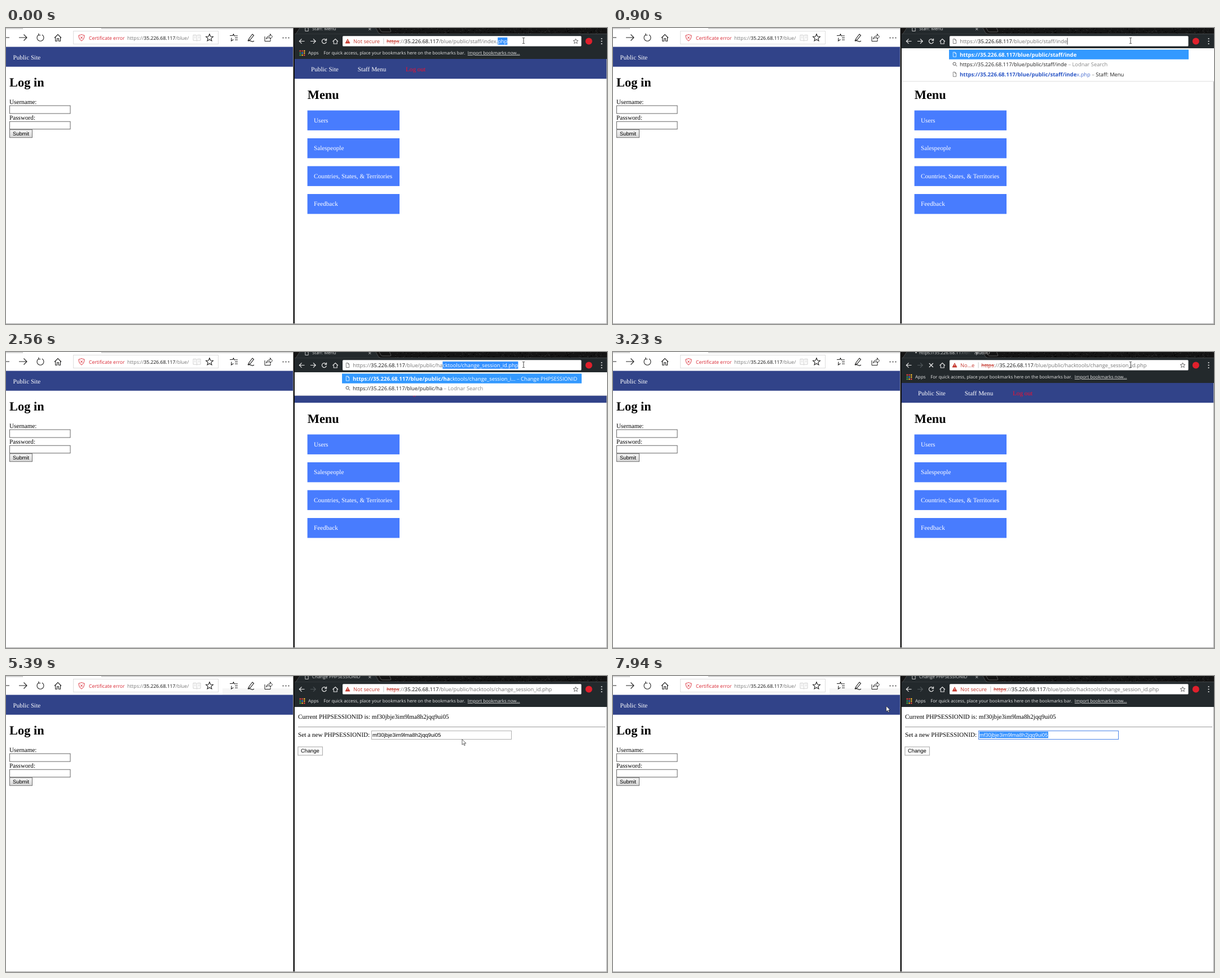
Recreate the animation shown at these times as an HTML page. Size 1066x526 px, loop 8 s.

```html
<!DOCTYPE html>
<html lang="en">
<head>
<meta charset="utf-8">
<title>Two browser windows</title>
<style>
  html, body { margin: 0; width: 100%; height: 100%; overflow: hidden; background: #fff; }
  svg { display: block; width: 1066px; height: 526px; }
  text { white-space: pre; text-rendering: geometricPrecision; }
  .ui { font: 9.34px "Open Sans", "Noto Sans", sans-serif; }
  .bar { font: 7.95px "Open Sans", "Noto Sans", sans-serif; }
  .edge { font: 8.62px "Open Sans", "Noto Sans", sans-serif; }
  .page { font: 11.2px "Liberation Serif", "Times New Roman", serif; }
  .head { font: bold 22.4px "Liberation Serif", "Times New Roman", serif; }
  .form { font: 9.33px "Liberation Sans", Arial, sans-serif; }
  .b { font-weight: bold; font-size: 9.55px; }
  .strike { text-decoration: line-through; }
</style>
</head>
<body>
<svg id="stage" viewBox="0 0 1066 526" xmlns="http://www.w3.org/2000/svg">
  <defs>
    <linearGradient id="face" x2="0" y2="1"><stop stop-color="#f6f6f6"/><stop offset="1" stop-color="#d6d6d6"/></linearGradient>
    <linearGradient id="fade"><stop stop-color="#23292c" stop-opacity="0"/><stop offset="1" stop-color="#23292c"/></linearGradient>
  </defs>
  <g id="left"></g><g id="view"></g><g id="chrome"></g><g id="mouse"></g>
</svg>
<script>
const LOOP = 8000;
const NAVY = '#314389', TOOL = '#23292c', SELECT = '#3390ff', RED = '#c5392f';
const HOST = '35.226.68.117', BASE = `https://${HOST}/blue/public/`;
const SESSION = 'mf30jbje3im9lma8h2jqq9ui05';
const CHANGE = 'hacktools/change_session_id.php';
const history = [
  [CHANGE, 'Change PHPSESSIONID'],
  ['staff/login.php', 'Staff: Menu'],
  ['staff/index.php', 'Staff: Menu'],
];
const $ = id => document.getElementById(id);

const rect = (x, y, w, h, fill, more = '') =>
  `<rect x="${x}" y="${y}" width="${w}" height="${h}" fill="${fill}" ${more}/>`;
const frame = (x, y, w, h, color, fill = '#fff') => rect(x, y, w, h, fill, `stroke="${color}"`);
const line = (d, color, width = 1, fill = 'none') =>
  `<path d="${d}" stroke="${color}" stroke-width="${width}" fill="${fill}"/>`;
const dot = (x, y, r, fill) => `<circle cx="${x}" cy="${y}" r="${r}" fill="${fill}"/>`;
const text = (x, y, cls, s, fill = '#000', more = '') =>
  `<text x="${x}" y="${y}" class="${cls}" fill="${fill}" ${more}>${s}</text>`;
const span = (s, fill, cls = '') => `<tspan fill="${fill}" class="${cls}">${s}</tspan>`;

function star(x, y, r, color, width) {
  const points = Array.from({ length: 10 }, (_, i) => {
    const a = i * Math.PI / 5, d = i % 2 ? r * .45 : r;
    return `${x + d * Math.sin(a)} ${y - d * Math.cos(a)}`;
  });
  return line(`M${points.join('L')}Z`, color, width);
}
const file = (x, y, color) =>
  line(`M${x - 2.7} ${y - 4}h3.4l2 2v6h-5.4zM${x + .6} ${y - 4}v2.2h2`, color, .8);

// Left window: toolbar and login page
function drawLeft(shade) {
  const ink = '#222';
  return rect(0, 0, 510, 526, '#fff')
    + line('M0 1h29M170 1h340', '#aaa') + line('M29.5 0v2M169.5 0v2', '#ccc')
    + (shade ? rect(384, 22, 125, 11.5, '#f6f6f6') : '')
    + line('M0 17h6M23 17h14M31.5 11.5l5.5 5.5-5.5 5.5', ink, 1.1)
    + line('M58 12a6 6 0 1 0 6 0M58 9.5v3.3h3.3', ink, 1.1)
    + line('M86 17.5l6-6 6 6M87.7 16.5v6.8h3v-4.5h2.8v4.5h3v-6.8', ink, 1.1)
    + frame(119.5, 5.5, 257, 23, '#dedede')
    + line('M134 11.5q2.5 1.5 5 1.5 0 7-5 10-5-3-5-10 2.500 0 5-1.500zM132 15.200l4 4m0-4l-4 4', '#d8222e', .9)
    + text(147, 20.6, 'edge', 'Certificate error', '#d8222e')
    + text(215, 20.6, 'edge', span('https://', '#777') + span(HOST, '#111') + span('/blue/', '#777'))
    + line('M332 12.500h5l1.500 1 1.500-1h5v9.500h-5l-1.500 1-1.500-1h-5zM338.500 13.500v9M334 15h2.500m-2.500 2.500h2.500M341 15h2.500m-2.500 2.500h2.500', '#c4c4c4', .8)
    + star(361, 17.500, 6.700, ink, 1.100)
    + line('M397 13.500h5l1.500-2.500 1.500 3h6M400 17.500l-.500 5.500 4-2.500M406 17.500h5M406 21h5', ink, 1.100)
    + line('M429 23l2-4 6-8 2.500 2-6 7.500-4.500 2.500q4-1 6 .500t5-.500', ink, 1.100)
    + line('M459 15v8.500h10v-3M461.500 19.500q1-5.500 7-5.500v-3.500l4 5-4 4.500v-3q-4.500-.500-7 2.500z', ink, 1)
    + dot(491.500, 17.500, .9, ink) + dot(496.500, 17.500, .9, ink) + dot(501.500, 17.500, .9, ink)
    + rect(0, 33.500, 509, 35.300, NAVY)
    + text(12.500, 55.600, 'page', 'Public Site', '#fff')
    + text(6, 104.200, 'head', 'Log in')
    + text(6, 134.700, 'page', 'Username:') + frame(6.500, 138, 107.500, 14, '#666')
    + text(6, 162.900, 'page', 'Password:') + frame(6.500, 166.200, 107.500, 13.500, '#666')
    + frame(6.500, 180.700, 40, 14, '#707070', 'url(#face)')
    + text(12, 191.300, 'form', 'Submit')
    + rect(509, 0, 1, 526, '#888') + rect(510, 0, 2.300, 526, '#111');
}

function drawMenu() {
  const items = ['Users', 'Salespeople', 'Countries, States, &amp; Territories', 'Feedback'];
  return rect(512, 55, 554, 35.200, NAVY)
    + text(541, 76.600, 'page', 'Public Site', '#fff')
    + text(623.800, 76.600, 'page', 'Staff Menu', '#fff')
    + text(709, 76.600, 'page', 'Log out', '#f5102e')
    + text(534.800, 125.700, 'head', 'Menu')
    + items.map((s, i) => rect(534.600, 146.500 + i * 49.500, 163.400, 35.400, '#487cfe')
      + text(546, 167.700 + i * 49.500, 'page', s, '#fff')).join('');
}

function drawForm(marked) {
  const from = 772 - 122 * marked;
  return text(518, 76, 'page', `Current PHPSESSIONID is: ${SESSION}`)
    + line('M518 90.500h545', '#999')
    + text(518, 107.900, 'page', 'Set a new PHPSESSIONID:')
    + frame(648.500, 97.500, 248, 15, marked ? '#4d86e8' : '#b0b0b0')
    + text(650, 107.700, 'form', SESSION)
    + (marked ? `<clipPath id="mark">${rect(from, 98.500, 772 - from, 12, '#000')}</clipPath>`
      + `<g clip-path="url(#mark)">${rect(from, 98.500, 122, 12, SELECT)}${text(650, 107.700, 'form', SESSION, '#fff')}</g>` : '')
    + frame(517.900, 125.900, 43.500, 15, '#a8a8a8', '#fbfbfb')
    + text(523, 136.400, 'form', 'Change');
}

function speckle() {
  let seed = 7, out = '';
  const rnd = () => (seed = seed * 16807 % 2147483647) / 2147483647;
  for (let i = 0; i < 220; i++)
    out += rect(Math.floor(690 + rnd() * 376), Math.floor(rnd() * 10), 2, 1, rnd() < .5 ? '#262626' : '#060606');
  return out;
}
const TEXTURE = speckle();

function drawFrame(s) {
  const pale = '#e8e8e8', dim = '#50575a';
  const colors = ['#e8453c', '#e8453c', '#f9bb2d', '#3aa757', '#4688f1', '#f9bb2d', '#3aa757', '#f9bb2d', '#e8453c'];
  const grid = colors.map((c, i) => rect(520.600 + i % 3 * 3.700, 39.600 + Math.floor(i / 3) * 3.700, 2.400, 2.400, c)).join('');
  return rect(512, 0, 554, 10.500, '#141414') + TEXTURE
    + `<path d="M514 10.500L521 0H656L663 10.500Z" fill="${TOOL}"/>`
    + line('M514 10.500L521 0M656 0l4 7.500q1 2.500 4 2.500', '#555', .8)
    + line('M662 0l3 5.500q1 1.500 3 1.500h13q2.500 0 1.500-2l-2-5', '#666', .8)
    + rect(512, 10.300, 554, 44.700, TOOL)
    + (s.busy ? dot(537.500, 1, 1.200, '#ccc') : file(533.500, 1.500, pale))
    + text(543, 4, 'bar', s.tab, '#d5d5d5')
    + (s.busy ? rect(610, 0, 27, 8, 'url(#fade)') + rect(637, 0, 4, 8, TOOL) : '')
    + line('M643.300 0l4 4m0-4l-4 4', '#ccc', .9)
    + line('M529.500 23.500h-9M524.500 19.300l-4.200 4.200 4.200 4.200', pale, 1.200)
    + line('M540 23.500h9M545 19.300l4.200 4.200-4.200 4.200', s.next ? pale : dim, 1.200)
    + (s.busy ? line('M560.800 20l7 7m0-7l-7 7', pale, 1.300)
      : line('M567.500 21a4 4 0 1 0 .8 3.500M568.500 18.800v3.400h-3.400', pale, 1.200))
    + line('M579.500 24l4.700-4.500 4.700 4.500M581.200 23.500v4.500h6v-4.500', pale, 1.100)
    + rect(597, 14.300, 423.500, 18.200, '#fff', 'rx="1.500"')
    + dot(1033.800, 23.500, 6, '#e0202c')
    + [19, 23.500, 28].map(y => dot(1056.500, y, 1.100, pale)).join('')
    + grid + text(536, 46.900, 'bar', 'Apps', pale)
    + text(563.200, 46.900, 'bar', 'For quick access, place your bookmarks here on the bookmarks bar.', pale)
    + text(818.800, 46.900, 'bar', 'Import bookmarks now...', pale, 'text-decoration="underline"');
}

function drawUrl(x, path, secureMark) {
  const scheme = secureMark ? span('https', RED, 'strike') + span('://', '#777') : span('https://', '#777');
  return text(x, 26.900, 'ui', scheme + span(HOST, '#111') + span('/blue/public/' + path, '#777'), '#777', 'id="url"');
}

function drawResting(s) {
  const x = s.urlX;
  return line('M606 19.700l4 7.300h-8z', RED, .8, RED) + rect(605.600, 21.500, .9, 3, '#fff')
    + (s.chip ? text(616, 26.900, 'ui', s.chip, RED) + line(`M${x - 5.200} 18.500v10`, '#bbb', .8) : '')
    + star(1010.500, 23.700, 4.600, '#555', .9) + drawUrl(x, s.path, true);
}

function drawTyping(q) {
  const auto = q.startsWith('h');
  const hits = q ? [history.find(h => h[0].startsWith(q))] : history;
  const title = (s, dash, color) => span(' – ', dash) + span(s, color);
  const first = span(BASE + q, '#fff', 'b')
    + (auto ? span(CHANGE.slice(q.length, 26) + '...', '#fff') + title(history[0][1], '#b9dcff', '#fff') : '');
  const rows = [first, span(BASE + q, '#222') + title('Lodnar Search', '#999', '#888')];
  if (!auto) for (const [path, name] of hits)
    rows.push(span(BASE + q, '#2a56c6', 'b') + span(path.slice(q.length), '#4a6fd0') + title(name, '#888', '#222'));
  const bottom = 42 + 17.600 * rows.length;
  return file(606, 23.500, '#666') + drawUrl(615.300, auto ? CHANGE : q, false)
    + rect(512, 36, 554, bottom - 36, '#fff') + line(`M512 ${bottom}h554`, '#dedede')
    + rect(596, 38.400, 425, 17.300, '#3399ff')
    + rows.map((r, i) => {
      const y = 47.100 + i * 17.600;
      const icon = i === 1 ? line(`M607.600 ${y + .8}l2.600 2.600M608.200 ${y - 1}a2.600 2.600 0 1 0-5.200 0 2.600 2.600 0 1 0 5.200 0`, '#555', 1)
        : file(606, y, i ? '#666' : '#fff');
      return icon + text(615, y + 3.500, 'ui', r);
    }).join('');
}

// Highlights the end of the address, or places the caret there
function finishUrl(s) {
  const url = $('url'), x = +url.getAttribute('x'), all = url.textContent;
  const auto = s.typed && s.typed.startsWith('h');
  const kept = auto ? BASE + s.typed : s.markEnd ? all.slice(0, -3) : all;
  const start = x + url.getSubStringLength(0, kept.length);
  const marked = all.slice(kept.length);
  if (marked) {
    const width = x + url.getComputedTextLength() - start;
    url.insertAdjacentHTML('afterend', rect(start, 16.800, width, 13, SELECT) + text(start, 26.900, 'ui', marked, '#fff'));
  } else if (s.typed !== null) {
    url.insertAdjacentHTML('afterend', rect(start + .3, 17.500, .8, 12, '#222'));
  }
}

function drawMouse([kind, x, y]) {
  const shape = kind === 'beam'
    ? line('M-2-5h1.500l.5.5.5-.5h1.500M0-4.500v9M-2 5h1.500l.5-.5.5.5h1.500', '#333', .9)
    : line('M0 0v9.700l2.300-2.100 1.500 3.400 1.600-.7-1.500-3.300h3z', '#222', .7, '#fff');
  return `<g transform="translate(${x} ${y})">${shape}</g>`;
}

const start = {
  page: 'menu', tab: 'Staff: Menu', busy: false, next: true, typed: null, markEnd: true,
  path: 'staff/index.php', chip: 'Not secure', urlX: 675, marked: 0, shade: false,
  mouse: ['beam', 918, 22.500],
};
const type = (t, typed) => [t, { typed, markEnd: false }];
const move = (t, kind, x, y, more) => [t, { mouse: [kind, x, y], ...more }];
const steps = [
  [0, start],
  type(500, 'staff/index.'), type(770, 'staff/index'), type(900, 'staff/inde'), type(1050, 'staff/ind'),
  type(1150, 'staff/in'), type(1250, 'staff/i'), type(1350, 'staff/'), type(1450, 'staff'),
  type(1590, 'staf'), type(1730, 'sta'), type(1870, 'st'),
  type(2140, 's'), type(2280, ''), type(2420, 'h'), type(2560, 'ha'),
  [2970, { typed: null, path: CHANGE, chip: '', urlX: 615, busy: true, next: false, tab: BASE }],
  [3100, { chip: '...', urlX: 633 }],
  [3230, { chip: 'No...e', urlX: 653.300 }],
  [3360, { chip: 'Not secure', urlX: 675, busy: false, tab: 'Change PHPSESSIONID', page: 'form' }],
  move(3500, 'arrow', 884, 44), move(3750, 'arrow', 830, 92), move(3890, 'arrow', 800, 122),
  move(4040, 'arrow', 770, 119, { shade: true }), move(4180, 'arrow', 722, 94), move(4320, 'beam', 676, 74),
  move(4460, 'beam', 660, 73), move(4600, 'beam', 690, 73), move(4740, 'beam', 730, 72),
  move(4870, 'beam', 765, 71), move(5010, 'beam', 785, 70),
  move(5150, 'arrow', 794, 82), move(5270, 'arrow', 804, 100), move(5390, 'arrow', 809, 112.500),
  move(5520, 'arrow', 808, 114), move(5660, 'beam', 800, 108), move(5800, 'beam', 788, 105), move(5940, 'beam', 777, 104),
  move(6340, 'beam', 730, 103, { marked: .35 }), move(6480, 'beam', 672, 101, { marked: .82 }),
  move(6620, 'arrow', 634, 86, { marked: 1 }), move(6760, 'arrow', 614.500, 50),
  move(7940, 'arrow', 484.700, 53.500),
];
let state = {};
const timeline = steps.map(([t, change]) => [t, state = { ...state, ...change }]);

function render(s) {
  $('left').innerHTML = drawLeft(s.shade);
  $('view').innerHTML = rect(512, 55, 554, 471, '#fff')
    + (s.page === 'menu' ? drawMenu() : drawForm(s.marked))
    + rect(0, 525, 1066, 1, '#a5a5a5') + rect(1065, 55, 1, 471, '#a5a5a5');
  $('chrome').innerHTML = drawFrame(s) + (s.typed === null ? drawResting(s) : drawTyping(s.typed));
  finishUrl(s);
  $('mouse').innerHTML = drawMouse(s.mouse);
}

const began = performance.now();
let shown = null;
function tick() {
  const t = (performance.now() - began) % LOOP;
  const now = timeline.filter(e => e[0] <= t).pop()[1];
  if (now !== shown) render(shown = now);
  requestAnimationFrame(tick);
}
tick();
</script>
</body>
</html>
```
